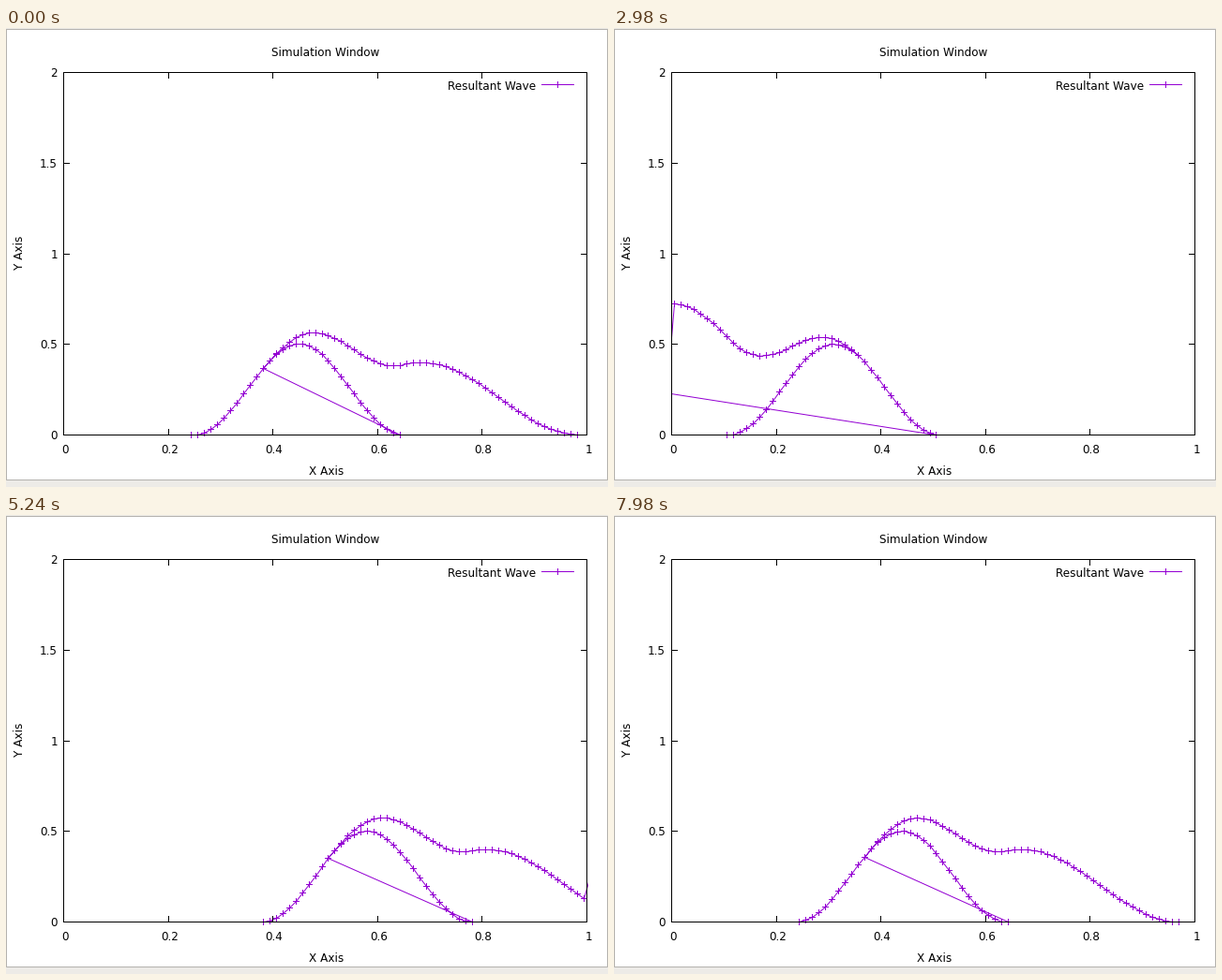
These frames come from a looping animation (642x490 px, 8 s). A matplotlib script:

```python
import math

import matplotlib.pyplot as plt
import numpy as np
from matplotlib.animation import FuncAnimation
from matplotlib.markers import MarkerStyle
from matplotlib.patches import Rectangle

W, H, DPI = 642, 490, 100
PX = 72 / DPI                      # one pixel in points
FRAMES, STEP_MS = 400, 20

LEFT, RIGHT, TOP, BOTTOM = 61.5, 619.5, 47.5, 434.5
UNIT_X, UNIT_Y = RIGHT - LEFT, (BOTTOM - TOP) / 2
PURPLE = "#9400d3"
CELLS = 80

# Pace of the simulation: time in ms against simulation step
TIMES = [0, 820, 860, 1600, 1660, 1680, 1960, 2980, 3320, 4240, 4940,
         6140, 6160, 6180, 6600, 7360, 7420, 7440, 7980]
STEPS = [0, 72, 75, 149, 149, 157, 185, 273, 296, 378, 467,
         589, 589, 594, 644, 716, 716, 726, 793]


def bounce(n, stops):
    """Centre of a pulse that runs to and fro between the walls."""
    i = n % (2 * stops)
    if i < stops:
        return (i + 1) / (stops + 1) + 1e-9
    return (2 * stops - i) / (stops + 1) - 1e-9


def add_wave(field, centre, reach, height, xs, ys):
    """Add one pulse to the field, folding it at the walls."""
    first = int((centre - reach) * CELLS)
    last = int((centre + reach) * CELLS)
    for i in range(first, last + 1):
        cell = i
        if i < 0:
            cell = -i - 1
        elif i >= CELLS:
            cell = 2 * CELLS - i - 1
        x = (i + 0.5) / CELLS
        dist = min(abs(x - centre) / reach, 1)
        field[cell] += height * 0.5 * (math.cos(math.pi * dist) + 1)
        xs.append(x)
        ys.append(field[cell])


def wave_points(step):
    field = [0.0] * CELLS
    xs, ys = [], []
    add_wave(field, bounce(153 + step, 99), 0.2, 0.5, xs, ys)
    add_wave(field, bounce(136 + step, 199), 0.3, 0.4, xs, ys)
    return np.array(xs), np.array(ys)


def to_pixels(x, y):
    """Column and row of a point of the plot."""
    return np.floor(LEFT + UNIT_X * x), np.floor(BOTTOM - UNIT_Y * y)


fig = plt.figure(figsize=(W / DPI, H / DPI), dpi=DPI, facecolor="#edebe7")
ax = fig.add_axes([0, 0, 1, 1])
ax.set_xlim(0, W)
ax.set_ylim(H, 0)
ax.axis("off")


def stroke(xs, ys, color="black", z=4):
    line, = ax.plot(xs, ys, color=color, lw=PX, zorder=z, snap=False,
                    solid_capstyle="projecting")
    return line


def label(x, y, text, ha="center", **kw):
    kw.setdefault("va", "baseline")
    ax.text(x, y, text, ha=ha, family="DejaVu Sans", size=12 * PX, **kw)


# Window
ax.add_patch(Rectangle((0, 1), W, 482, fc="white", ec="none", zorder=0))
stroke([0.5, W - 0.5, W - 0.5, 0.5, 0.5], [1.5, 1.5, 482.5, 482.5, 1.5],
       "#b4b2ae", 1)

# Frame and ticks
stroke([LEFT, RIGHT, RIGHT, LEFT, LEFT], [BOTTOM, BOTTOM, TOP, TOP, BOTTOM])
for k in range(6):
    x = to_pixels(k / 5, 0)[0] + 0.5
    if 0 < k < 5:
        stroke([x, x], [BOTTOM, BOTTOM - 6])
        stroke([x, x], [TOP, TOP + 6])
    label(x + 1.5, 454, f"{k / 5:g}")
for k in range(5):
    y = to_pixels(0, k / 2)[1] + 0.5
    if 0 < k < 4:
        stroke([LEFT, LEFT + 6], [y, y])
        stroke([RIGHT, RIGHT - 6], [y, y])
    label(55, y + 4.5, f"{k / 2:g}", ha="right")

label(340.5, 30, "Simulation Window")
label(341.5, 477, "X Axis")
label(14, 240, "Y Axis", rotation=90, va="center")
label(565, 66, "Resultant Wave", ha="right")

# Curve, its crosses and the legend sample
cross = dict(ls="none", marker=MarkerStyle("+", capstyle="projecting"),
             color=PURPLE, ms=6 * PX, mew=PX, clip_on=False, zorder=3)
stroke([571.5, 605.5], [60.5, 60.5], PURPLE, 3)
ax.plot([588], [60], **cross)
curve = stroke([], [], PURPLE, 2)
curve.set_clip_path(Rectangle((60.5, 47), 560, 388, transform=ax.transData))
crosses, = ax.plot([], [], **cross)


def draw(frame):
    step = int(round(float(np.interp(frame * STEP_MS, TIMES, STEPS))))
    xs, ys = wave_points(step)
    px, py = to_pixels(xs, ys)
    curve.set_data(px + 0.5, py + 0.5)
    inside = (xs > 0) & (xs < 1)
    crosses.set_data(px[inside], py[inside])
    return curve, crosses


anim = FuncAnimation(fig, draw, frames=FRAMES, interval=STEP_MS,
                     init_func=lambda: draw(0), repeat=True, repeat_delay=0)
plt.show()
```
